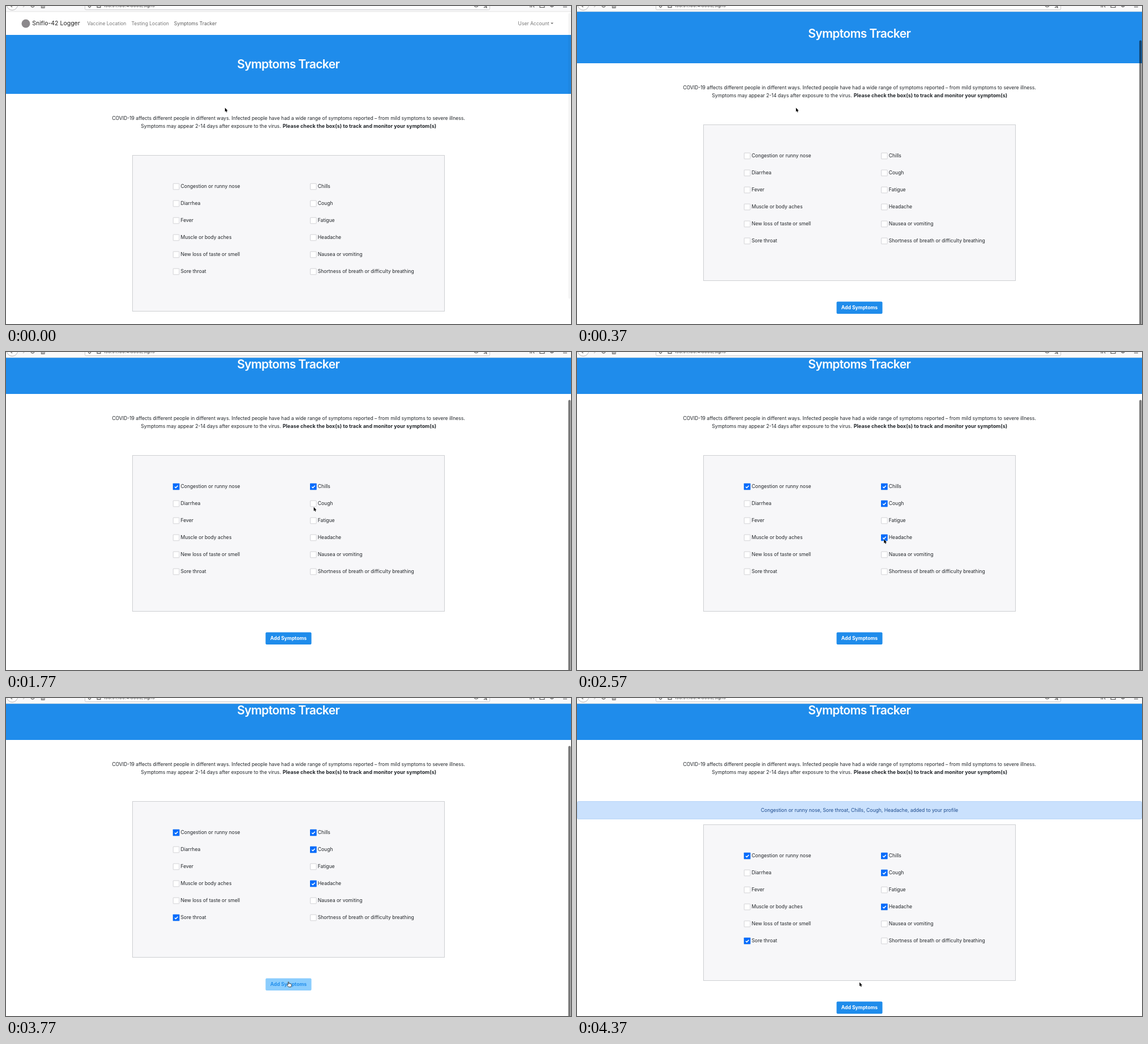
Animation, 998 px wide and 561 px high, one loop 4570 ms. Source, as an HTML page:

```html
<!DOCTYPE html>
<html lang="en">
<head>
<meta charset="utf-8">
<title>Symptoms Tracker</title>
<style>
  html, body { margin: 0; width: 100%; height: 100%; overflow: hidden; background: #fff; }
  svg { display: block; width: 100%; height: 100%; }
  text {
    font: 8.61px Inter, "Open Sans", sans-serif;
    font-optical-sizing: none;
    fill: #212529;
    white-space: pre;
  }
  .mid { text-anchor: middle; }
  .bold { font-size: 8.85px; font-weight: 700; letter-spacing: .006em; }
  .label { font-size: 8.65px; font-weight: 700; }
  .nav { font-size: 8.5px; fill: #787878; }
  .brand { font-size: 10.5px; fill: #222; }
  .url { font-size: 8px; fill: #444; }
  .title { font-size: 21px; font-weight: 600; letter-spacing: -.03em; fill: #fff; }
  .alert { font-size: 8.57px; fill: #1c4a8c; }
  .icon { fill: none; stroke: #555; stroke-width: 1.1; }
</style>
</head>
<body>
<svg viewBox="0 0 998 561" preserveAspectRatio="none">
  <defs>
    <clipPath id="view"><rect y="10" width="998" height="551"/></clipPath>
  </defs>
  <rect width="998" height="561" fill="#fff"/>

  <g clip-path="url(#view)">
    <g id="page">
      <circle cx="35" cy="31" r="7.5" fill="#8b888b"/>
      <text class="brand" x="46.3" y="34.3">Sniflo-42 Logger</text>
      <text class="nav" x="143.4" y="33.7">Vaccine Location</text>
      <text class="nav" x="221.5" y="33.7">Testing Location</text>
      <text class="nav" x="296.7" y="33.7" style="fill:#5c5c5c">Symptoms Tracker</text>
      <text class="nav" x="904.6" y="33.7">User Account</text>
      <path d="M962 29.4h5l-2.5 2.6z" fill="#707070"/>

      <rect y="51" width="998" height="104" fill="#1f8ceb"/>
      <text class="title mid" x="498.7" y="109.5">Symptoms Tracker</text>

      <text class="mid" x="499" y="201.2">COVID-19 affects different people in different ways. Infected people have had a wide range of symptoms reported – from mild symptoms to severe illness.</text>
      <text x="238.3" y="214.5">Symptoms may appear 2-14 days after exposure to the virus.</text>
      <text class="bold" x="488.8" y="214.5">Please check the box(s) to track and monitor your symptom(s)</text>

      <g id="alert">
        <rect x=".5" y="263.5" width="997" height="31" rx="2" fill="#cae1fd" stroke="#b6d5f8"/>
        <text class="alert mid" x="499" y="282.3">Congestion or runny nose, Sore throat, Chills, Cough, Headache, added to your profile</text>
      </g>

      <g id="form">
        <rect x="223.5" y="263.5" width="551" height="275" fill="#f7f7f9" stroke="#cdcfd2"/>
        <g id="options"></g>
        <rect id="button" x="458.5" y="575.5" width="81" height="21.5" rx="2"/>
        <text id="buttonText" class="label mid" x="499" y="589.2">Add Symptoms</text>
      </g>
    </g>
  </g>

  <g id="chrome">
    <rect width="998" height="10" fill="#f9f9fa"/>
    <path d="M0 9.8H998" stroke="#dcdcde" stroke-width=".8"/>
    <rect x="139.5" y="-15" width="715" height="21.6" rx="2" fill="#fff" stroke="#c8c8ca"/>
    <circle cx="11" cy="-2.5" r="9.8" fill="#fff" stroke="#b5b5b7"/>
    <path class="icon" d="M7.5 -1l3.5 3.2M44 0a3.2 3.2 0 0 0 6 0M62.5 -1V3.3H68V-1M65.2 0V3
      M145 -1q.5 2.8 2.6 3.6q2 -.8 2.6 -3.6M161 -1V2.4H167V-1
      M827 -1a3.6 3.6 0 0 0 7 0M844 3l2.6 -1.8L849 3l-.6 -4
      M926 -1V2.5M928.5 -1V2.5M931 -1l2 3.5M943 -1V2.5H951V-1
      M961 -1a3.4 3.4 0 0 0 6.6 0M964.2 -1v1.5M984 1.7H991"/>
    <path class="icon" d="M30 2.2l3 -3" style="stroke:#bbb"/>
    <text class="url" x="172" y="1.6">198.51.100.4:8000/signs</text>
  </g>

  <rect id="thumb" x="993.2" width="4.2" height="504" rx="2.1"/>
  <path id="arrow" d="M.3 .5v7l1.5 -1.4l1.1 2.4l1.2 -.5l-1.1 -2.3h2.1z" fill="#000" stroke="#fff" stroke-width=".7" paint-order="stroke"/>
  <path id="hand" d="M1.2 .6Q2.1 -.2 2.7 .7V3.5L3.9 3.2L5.2 3.6L6.6 4Q7.6 4.3 7.4 5.6L6.5 9.3H2.2L-.6 5.9Q-.6 4.7 .5 5L1.2 5.6Z" fill="#fff" stroke="#222" stroke-width=".8"/>
</svg>

<script>
const LOOP = 4570, SUBMIT = 4000;
const $ = id => document.getElementById(id);

// name, time at which the box gets ticked
const columns = [
  [295.3, [["Congestion or runny nose", 1170], ["Diarrhea"], ["Fever"],
    ["Muscle or body aches"], ["New loss of taste or smell"], ["Sore throat", 3170]]],
  [537.5, [["Chills", 1570], ["Cough", 2000], ["Fatigue"],
    ["Headache", 2570], ["Nausea or vomiting"], ["Shortness of breath or difficulty breathing"]]]
];

// time, value(s): each holds until the next
const scrollSteps = [[0, 0], [170, 8], [370, 54], [570, 81]];
const thumbSteps = [[0, .04], [170, .3], [370, .52], [SUBMIT, .4], [4170, .2], [4370, 0]];
const pointerSteps = [
  [0, 386.5, 179], [1000, 302, 233], [1170, 307, 237], [1370, 526, 229],
  [1570, 543, 234], [1770, 543.3, 273], [2000, 542, 268], [2170, 542, 288],
  [2370, 542, 330], [2770, 353, 398], [3000, 302, 391], [3170, 301, 388.7],
  [3370, 400, 450], [3570, 482, 504], [3770, 497, 500.5], [4170, 498.7, 501]
];

const stepAt = (steps, t) => steps.findLast(s => s[0] <= t);
const show = (el, on) => el.setAttribute("visibility", on ? "visible" : "hidden");
const move = (el, x, y) => el.setAttribute("transform", `translate(${x} ${y})`);

function add(parent, tag, attrs, text = "") {
  const el = document.createElementNS("http://www.w3.org/2000/svg", tag);
  for (const key in attrs) el.setAttribute(key, attrs[key]);
  el.textContent = text;
  return parent.appendChild(el);
}

const ticks = [];
for (const [x, items] of columns) {
  items.forEach(([name, at], row) => {
    const g = add($("options"), "g", { transform: `translate(${x} ${313.2 + 30 * row})` });
    add(g, "rect", { width: 10.6, height: 10.6, rx: .6, fill: "#fff", stroke: "#c9cacd", "stroke-width": .8 });
    add(g, "text", { x: 13.2, y: 7.9 }, name);
    if (!at) return;
    const tick = add(g, "g", {});
    add(tick, "rect", { x: -.5, y: -.5, width: 11.6, height: 11.6, rx: .6, fill: "#066cfb" });
    add(tick, "path", { d: "M2.7 5.5L4.6 7.4L8.2 3.5", fill: "none", stroke: "#fff", "stroke-width": 1.5 });
    ticks.push({ tick, at });
  });
}

function draw(t) {
  const scroll = stepAt(scrollSteps, t)[1];
  const [, x, y] = stepAt(pointerSteps, t);
  const sent = t >= SUBMIT;
  const hover = t >= 3770 && !sent;
  const pointing = t >= 3770 && t < 4170;

  move($("page"), 0, -scroll);
  move($("form"), 0, sent ? 41 : 0);
  show($("alert"), sent);
  for (const { tick, at } of ticks) show(tick, t >= at);

  $("button").setAttribute("fill", hover ? "#8bcdfd" : "#1f8ceb");
  $("buttonText").style.fill = hover ? "#2490ec" : "#fff";

  $("thumb").setAttribute("y", 12.5 + .89 * scroll);
  $("thumb").setAttribute("opacity", stepAt(thumbSteps, t)[1]);

  show($("arrow"), !pointing);
  show($("hand"), pointing);
  move($("arrow"), x, y);
  move($("hand"), x, y);
}

const start = performance.now();
function tickFrame() {
  draw((performance.now() - start) % LOOP);
  requestAnimationFrame(tickFrame);
}
tickFrame();
</script>
</body>
</html>
```
